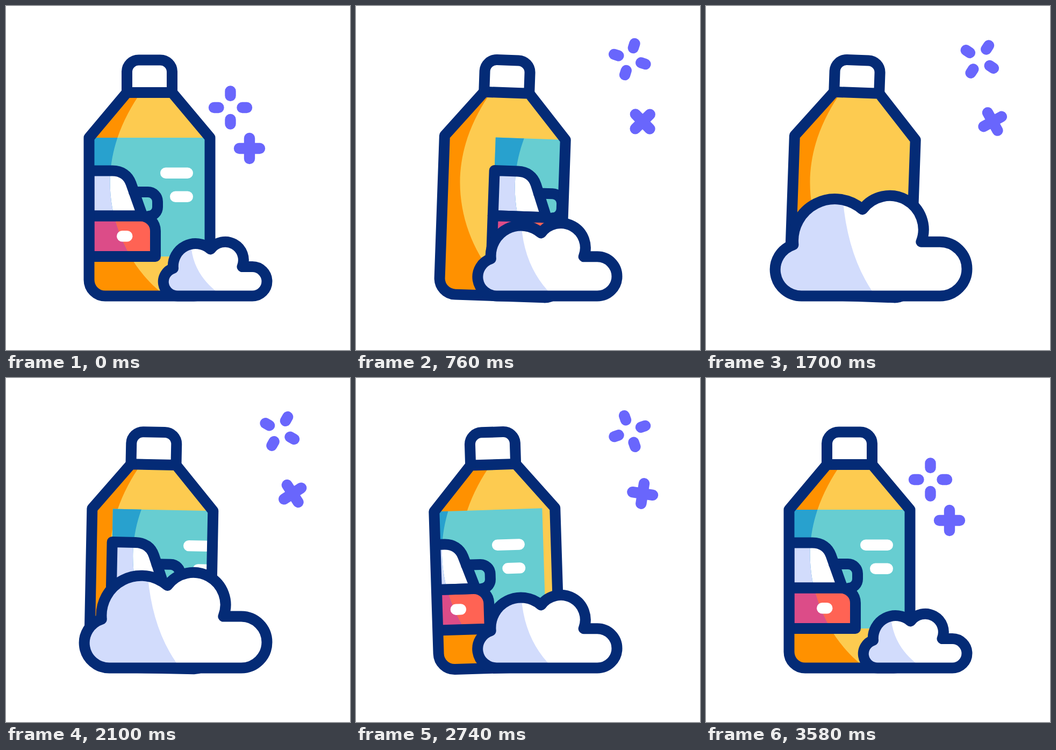
Write an HTML page that moves like this. It is 640x640 px and loops after 3.6 s.

```html
<!DOCTYPE html>
<html lang="en">
<head>
<meta charset="utf-8">
<title>Car wash bottle</title>
<style>
html, body { margin: 0; width: 100%; height: 100%; overflow: hidden; background: #fff; }
svg { display: block; width: 100vw; height: 100vh; }
.line { fill: none; stroke: #042b76; stroke-width: 20; stroke-linecap: round; stroke-linejoin: round; }
.spark { fill: none; stroke: #6966fc; stroke-width: 20.4; stroke-linecap: round; }
</style>
</head>
<body>
<svg viewBox="0 0 640 640">
  <defs>
    <path id="body" d="M225 161H309L379.5 245V509.5A30 30 0 0 1 349.5 539.5H184.5A30 30 0 0 1 154.5 509.5V245Z"/>
    <path id="curve" d="M100 168H246C211 220 193.5 275 193.5 328C193.5 405 228 482 285 530L300 545H100Z"/>
    <path id="cabin" d="M154.5 306.5H198C215 306.5 227 315 232.5 330L254 390.5H154.5Z"/>
    <path id="hood" d="M154.5 390.5H250A28 28 0 0 1 278 418.5V466H154.5Z"/>
    <path id="panel" d="M154.5 245H382.5V466H154.5Z"/>
    <path id="puff" d="M-166 0A26.4 26.4 0 0 1 -174.5 -51.5A42 42 0 0 1 -105 -87A34 34 0 0 1 -46 -54.4H-27.2A27.2 27.2 0 0 1 -27.2 0Z"/>
    <clipPath id="inBody"><use href="#body" id="bodyClip"/></clipPath>
    <clipPath id="inCurve"><use href="#curve"/></clipPath>
    <clipPath id="inPuff"><use href="#puff" id="puffClip"/></clipPath>
  </defs>

  <g clip-path="url(#inBody)">
    <rect x="100" y="150" width="330" height="410" fill="#fdcb50"/>
    <use href="#curve" fill="#ff9100"/>
    <g id="label">
      <use href="#panel" fill="#67cdd1"/>
      <use href="#cabin" fill="#fff"/>
      <use href="#hood" fill="#ff6354"/>
      <g clip-path="url(#inCurve)">
        <use href="#panel" fill="#28a1ce"/>
        <use href="#cabin" fill="#d2dcfc"/>
        <use href="#hood" fill="#dc4c88"/>
      </g>
      <path class="line" d="M238 346H264A18 18 0 0 1 282 364V374A17 17 0 0 1 265 391"/>
      <use href="#cabin" class="line"/>
      <use href="#hood" class="line"/>
      <g fill="#fff">
        <rect x="206" y="418" width="29.5" height="20.4" rx="10.2"/>
        <rect x="287" y="300.5" width="61" height="20.4" rx="10.2"/>
        <rect x="305" y="344.5" width="43" height="20.4" rx="10.2"/>
      </g>
    </g>
  </g>
  <g id="outline" class="line">
    <use href="#body"/>
    <path d="M225 161V122A22 22 0 0 1 247 100.5H287A22 22 0 0 1 309 122V161"/>
  </g>

  <g clip-path="url(#inPuff)">
    <rect x="100" y="300" width="420" height="260" fill="#fff"/>
    <path id="puffShade" fill="#d2dcfc"/>
  </g>
  <use href="#puff" id="puffLine" class="line"/>

  <path id="burst" class="spark" d="M0 -30.5V-22M0 22V30.5M-30.5 0H-22M22 0H30.5"/>
  <path id="plus" class="spark" d="M-19 0H19M0 -19V19"/>
</svg>
<script>
const LOOP = 3600;
const $ = id => document.getElementById(id);
const smooth = x => x * x * (3 - 2 * x);
const mix = (a, b, p) => a + (b - a) * p;

// Eased progress from 0 to 1 between two times
const ease = (t, from, to) => smooth(Math.min(1, Math.max(0, (t - from) / (to - from))));

// Gentler ease: cubic-bezier(1/6, 0, 5/6, 1)
function gentle(x) {
  if (x >= 1) return 1;
  let lo = 0, hi = 1;
  for (let i = 0; i < 24; i++) {
    const u = (lo + hi) / 2, v = 1 - u;
    if (u * v * v / 2 + 2.5 * u * u * v + u * u * u < x) lo = u; else hi = u;
  }
  return smooth(lo);
}

// Label speeds up to the right, glides back past its place, then settles
function labelShift(t) {
  if (t > 2600) return -30 * (1 - ease(t, 2600, 3300));
  const out = 95 * (t / 760) ** 2;
  const back = 68.5 * ((2600 - t) / 500) ** 2 - 30;
  return Math.min(250, t < LOOP / 2 ? Math.max(out, 0) : back);
}

const move = (id, value) => $(id).setAttribute("transform", value);

function bottle(t) {
  const tilt = 2 * (ease(t, 0, 700) - 2 * ease(t, 1885, 2600) + ease(t, 2600, 3300));
  const turn = `rotate(${tilt} 267 540)`;
  move("bodyClip", turn);
  move("outline", turn);
  move("label", `${turn} translate(${labelShift(t)} 0)`);
}

function cloud(t) {
  const grow = 0.853 * (ease(t, 0, 1745) - ease(t, 1745, 3510));
  const s = 1 + grow;
  const place = `translate(485.5 539.5) scale(${s})`;
  move("puffClip", place);
  move("puffLine", place);
  $("puffLine").style.strokeWidth = 20 / s;

  const x = 344 - 105 * grow, y = 539.5 - 97 * s;
  const cx = x + 3 + 7 * grow, cy = mix(y, 530, 0.6);
  const end = 485.5 - 95.5 * s;
  $("puffShade").setAttribute("d",
    `M100 ${y - 20}H${x}V${y}Q${cx} ${cy} ${end} 530L${end + 8} 545H100Z`);
}

function sparks(t) {
  const away = ease(t, 0, 500) - ease(t, 3080, 3500);
  const spin = 630 * gentle(t / 3510);
  const fly = (id, x0, y0, x1, y1, angle) =>
    move(id, `translate(${mix(x0, x1, away)} ${mix(y0, y1, away)}) rotate(${angle})`);
  fly("burst", 417.5, 189, 509.3, 99, spin);
  fly("plus", 453, 265, 533.2, 215, spin + 28 * away);
}

function draw(t) {
  bottle(t);
  cloud(t);
  sparks(t);
}

let start;
function tick(now) {
  if (start === undefined) start = now;
  draw((now - start) % LOOP);
  requestAnimationFrame(tick);
}
draw(0);
requestAnimationFrame(tick);
</script>
</body>
</html>
```
